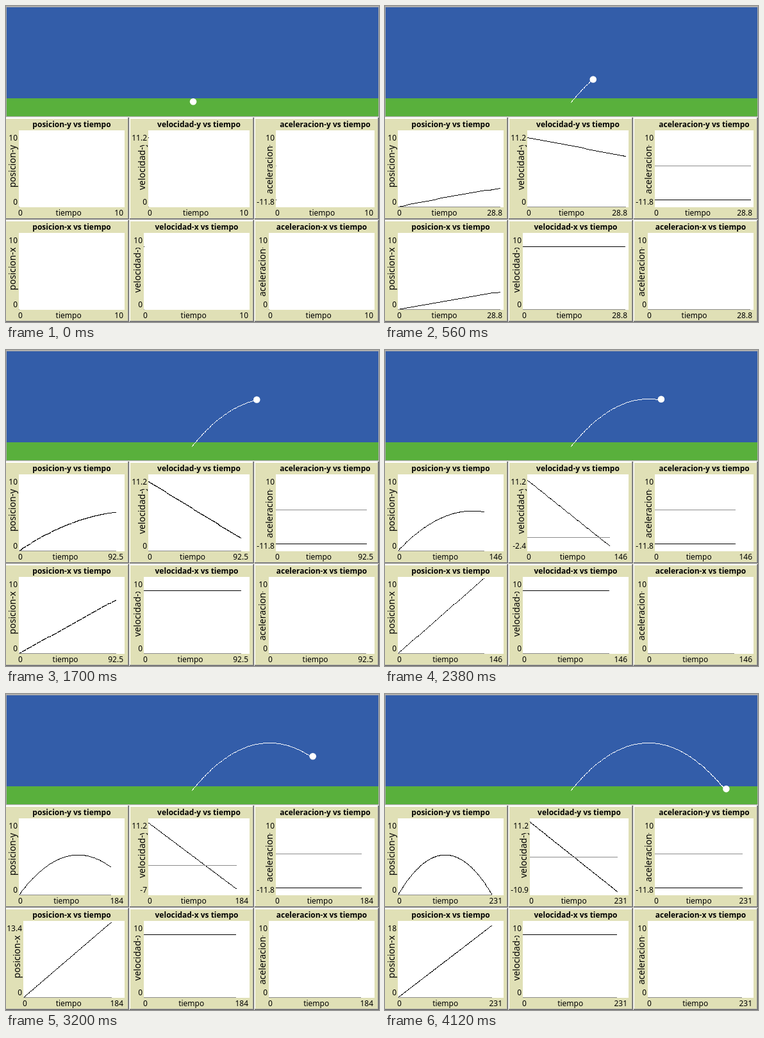
An HTML page for the animation above (4140 ms loop, 582 px wide and 493 px high).

```html
<!DOCTYPE html>
<html lang="es">
<head>
<meta charset="utf-8">
<title>Tiro parabólico</title>
<style>
  html, body { margin: 0; width: 100%; height: 100%; overflow: hidden; background: #fff; }
  svg { display: block; }
  text { font: 12px "Noto Sans", "Open Sans", sans-serif; }
  .title { font-weight: bold; text-anchor: middle; }
  .side { font-size: 14px; text-anchor: middle; }
  .end { text-anchor: end; }
  .mid { text-anchor: middle; }
  .line { fill: none; stroke-width: 1; stroke-linecap: square; shape-rendering: crispEdges; }
  .box { shape-rendering: crispEdges; }
</style>
</head>
<body>
<svg id="stage" width="582" height="493" viewBox="0 0 582 493">
  <clipPath id="sideClip"><rect x="-3" y="217" width="195" height="80"/></clipPath>
</svg>
<script>
const STEP_MS = 20, STEPS = 207, DT = 0.01, G = 9.8;
const SPEED = 13.1, ANGLE = 51 * Math.PI / 180;
const VX = SPEED * Math.cos(ANGLE), VY = SPEED * Math.sin(ANGLE);
const PATCH = 14.15;
const PLOT = { right: 185, top: 194.5, bottom: 313.5 };
const stage = document.getElementById('stage');

function add(parent, tag, attrs = {}, content = '') {
  const el = document.createElementNS('http://www.w3.org/2000/svg', tag);
  set(el, attrs);
  el.textContent = content;
  return parent.appendChild(el);
}
function set(el, attrs) {
  for (const key in attrs) el.setAttribute(key, attrs[key]);
}
const rect = (parent, x, y, width, height, fill) =>
  add(parent, 'rect', { x, y, width, height, fill, class: 'box' });
const line = (parent, stroke) => add(parent, 'path', { class: 'line', stroke });
const snap = v => Math.floor(v) + 0.5;
const pathOf = points => 'M' + points.map(p => p.map(snap).join(' ')).join('L') + 'h.01';
const nice = v => Math.abs(v) >= 100 ? Math.round(v) : Math.round(v * 10) / 10;
const labelWidth = s => [...s].reduce((w, c) => w + (c === '.' ? 3.2 : c === '-' ? 3.9 : 6.86), 0);

// Motion as a function of the step number
const motion = {
  'posicion-x': n => VX * n * DT,
  'posicion-y': n => n * DT * (VY - G * DT * (n + 1) / 2),
  'velocidad-x': () => VX,
  'velocidad-y': n => VY - G * DT * n,
  'aceleracion-x': () => 0,
  'aceleracion-y': () => -G
};

// Autoscaling axes: 25 % headroom in time, 10 % in value
function rangesOf(value) {
  const ranges = [];
  let xMax = 10, yMin = 0, yMax = 10;
  for (let n = 0; n < STEPS; n++) {
    const y = value(n);
    if (n > xMax) xMax = nice(n * 1.25);
    if (y > yMax) yMax = nice(yMin + (y - yMin) * 1.1);
    if (y < yMin) yMin = nice(yMax - (yMax - y) * 1.1);
    ranges.push({ xMax, yMin, yMax });
  }
  return ranges;
}

function makeWorld() {
  rect(stage, 0, 0, 582, 173, '#adadad');
  rect(stage, 1, 2, 580, 142, '#335da9');
  rect(stage, 1, 144, 580, 28, '#59b03c');
  const trail = line(stage, '#fff');
  const ball = add(stage, 'circle', { r: 5.3, fill: '#fff' });
  return n => {
    const points = [];
    for (let i = 0; i <= n; i++) {
      points.push([290.5 + PATCH * motion['posicion-x'](i), 150.5 - PATCH * motion['posicion-y'](i)]);
    }
    set(trail, { d: pathOf(points), visibility: n ? 'visible' : 'hidden' });
    set(ball, {
      cx: 292.1 + PATCH * motion['posicion-x'](n),
      cy: 149.2 - PATCH * motion['posicion-y'](n)
    });
  };
}

function makePlot(name, col, row) {
  const value = motion[name], ranges = rangesOf(value);
  const g = add(stage, 'g', { transform: `translate(${col * 195} ${row * 160})` });

  rect(g, -3, 173, 195, 160, '#e8e8e0');
  rect(g, -2, 174, 194, 159, '#666');
  rect(g, -2, 174, 193, 158, '#999');
  rect(g, -2, 174, 192, 157, '#fff');
  rect(g, -1, 176, 191, 155, '#e0e0b6');

  const area = rect(g, 20, 194, 165, 120, '#fff');
  const curve = line(g, '#000'), zero = line(g, '#8c8c8c');
  const title = add(g, 'text', { class: 'title', y: 189 }, name + ' vs tiempo');
  const clipped = add(g, 'g', { 'clip-path': 'url(#sideClip)' });
  const side = add(clipped, 'text', { class: 'side' }, name);
  const top = add(g, 'text', { class: 'end', y: 210 });
  const bottom = add(g, 'text', { class: 'end', y: 310 });
  const start = add(g, 'text', { y: 327 }, '0');
  const time = add(g, 'text', { class: 'mid', y: 327 }, 'tiempo');
  const end = add(g, 'text', { class: 'end', x: 183, y: 327 });

  return n => {
    const { xMax, yMin, yMax } = ranges[n];
    const widest = Math.max(labelWidth(String(yMin)), labelWidth(String(yMax)));
    const left = Math.max(20, Math.round(widest + 3.5));
    const toX = i => left + 0.5 + i / xMax * (PLOT.right - left - 1);
    const toY = v => PLOT.top + (yMax - v) / (yMax - yMin) * (PLOT.bottom - PLOT.top);

    const points = [];
    for (let i = 0; i <= n; i++) points.push([toX(i), toY(value(i))]);
    set(curve, { d: pathOf(points) });
    set(zero, { d: pathOf([[toX(0), toY(0)], [toX(n), toY(0)]]) });

    set(area, { x: left, width: PLOT.right - left });
    set(title, { x: name === 'posicion-x' ? 102.5 : (left + PLOT.right) / 2 });
    set(side, { transform: `translate(${left - 5.5} 250) rotate(-90)` });
    set(top, { x: left - 2 });
    set(bottom, { x: left - 2 });
    set(start, { x: left - 1 });
    set(time, { x: (left + 6 + 183 - labelWidth(String(xMax))) / 2 });
    top.textContent = yMax;
    bottom.textContent = yMin;
    end.textContent = xMax;
  };
}

const views = [makeWorld()];
['y', 'x'].forEach((axis, row) =>
  ['posicion', 'velocidad', 'aceleracion'].forEach((kind, col) =>
    views.push(makePlot(`${kind}-${axis}`, col, row))));

const render = n => views.forEach(draw => draw(n));
const began = performance.now();
let shown = 0;
render(0);

function tick() {
  const n = Math.floor((performance.now() - began) / STEP_MS) % STEPS;
  if (n !== shown) render(shown = n);
  requestAnimationFrame(tick);
}
requestAnimationFrame(tick);
</script>
</body>
</html>
```
